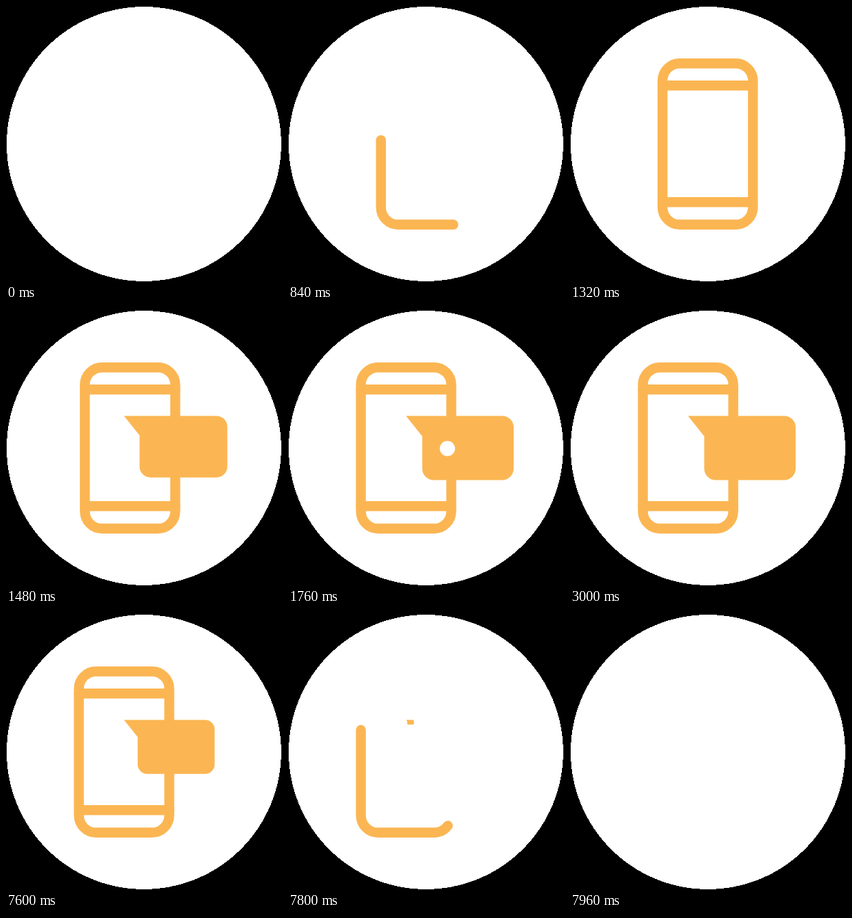
Write an HTML page that moves like this. It is 400x400 px and loops after 8000 ms.

```html
<!DOCTYPE html>
<html lang="en">
<head>
<meta charset="utf-8">
<title>Phone message</title>
<style>
  html, body { margin: 0; width: 100%; height: 100%; overflow: hidden; background: #000; }
  svg { display: block; width: 100%; height: 100%; }
  .line { fill: none; stroke: #fbb653; stroke-width: 14.4; stroke-linecap: round; }
</style>
</head>
<body>
<svg viewBox="0 0 400 400">
  <circle cx="199.9" cy="200" r="198.95" fill="#fff" shape-rendering="crispEdges"/>
  <g id="phone">
    <path id="body" class="line" pathLength="1"
      d="M265 108.2a25 25 0 0 0-25-25H159a25 25 0 0 0-25 25V291.8a25 25 0 0 0 25 25H240a25 25 0 0 0 25-25Z"/>
    <path class="line bar" pathLength="1" d="M134 115.2H265"/>
    <path class="line bar" pathLength="1" d="M265 284.2H134"/>
  </g>
  <g id="bubble">
    <path fill="#fbb653" d="M0 0H139.5a16.5 16.5 0 0 1 16.5 16.5V76.5a16.5 16.5 0 0 1-16.5 16.5H40a16.5 16.5 0 0 1-16.5-16.5V29.5Z"/>
    <g fill="#fff">
      <circle class="dot" cx="60" cy="47.3"/>
      <circle class="dot" cx="90.3" cy="47.3"/>
      <circle class="dot" cx="120.6" cy="47.3"/>
    </g>
  </g>
</svg>
<script>
  const LOOP = 8000;
  const phone = document.getElementById('phone');
  const body = document.getElementById('body');
  const bubble = document.getElementById('bubble');
  const bars = document.querySelectorAll('.bar');
  const dots = document.querySelectorAll('.dot');

  const span = (t, from, to) => Math.min(1, Math.max(0, (t - from) / (to - from)));
  const smooth = x => x * x * (3 - 2 * x);
  const easeOut = x => 1 - (1 - x) ** 2;
  const backOut = x => 1 + 2.70158 * (x - 1) ** 3 + 1.70158 * (x - 1) ** 2;

  function trim(el, from, to) {
    el.style.display = to - from > 0.002 ? '' : 'none';
    el.setAttribute('stroke-dasharray', `${to - from} 2`);
    el.setAttribute('stroke-dashoffset', -from);
  }

  function render(t) {
    const erase = smooth(span(t, 7600, 7950));
    const drawn = smooth(span(t, 580, 1277)) * (1 - erase);
    trim(body, 0.523 * (1 - drawn), 0.523 + 0.477 * drawn);

    const barLength = smooth(span(t, 1040, 1300)) * (1 - span(t, 7600, 7800));
    bars.forEach(bar => trim(bar, 0, barLength));

    const shift = 0.7 - 29.1 * smooth(span(t, 1296, 1586));
    phone.setAttribute('transform', `translate(${shift} 0)`);

    const size = backOut(span(t, 1380, 1680)) * (1 - span(t, 7560, 7820));
    bubble.style.display = size > 0.001 ? '' : 'none';
    bubble.setAttribute('transform', `translate(171 153.4) scale(${size})`);

    const gone = smooth(span(t, 2730, 2990));
    dots.forEach((dot, i) => {
      const start = 1560 + 280 * i;
      dot.setAttribute('r', 12 * easeOut(span(t, start, start + 280)) * (1 - gone));
    });
  }

  const origin = performance.now();
  function tick() {
    render((performance.now() - origin) % LOOP);
    requestAnimationFrame(tick);
  }
  render(0);
  requestAnimationFrame(tick);
</script>
</body>
</html>
```
